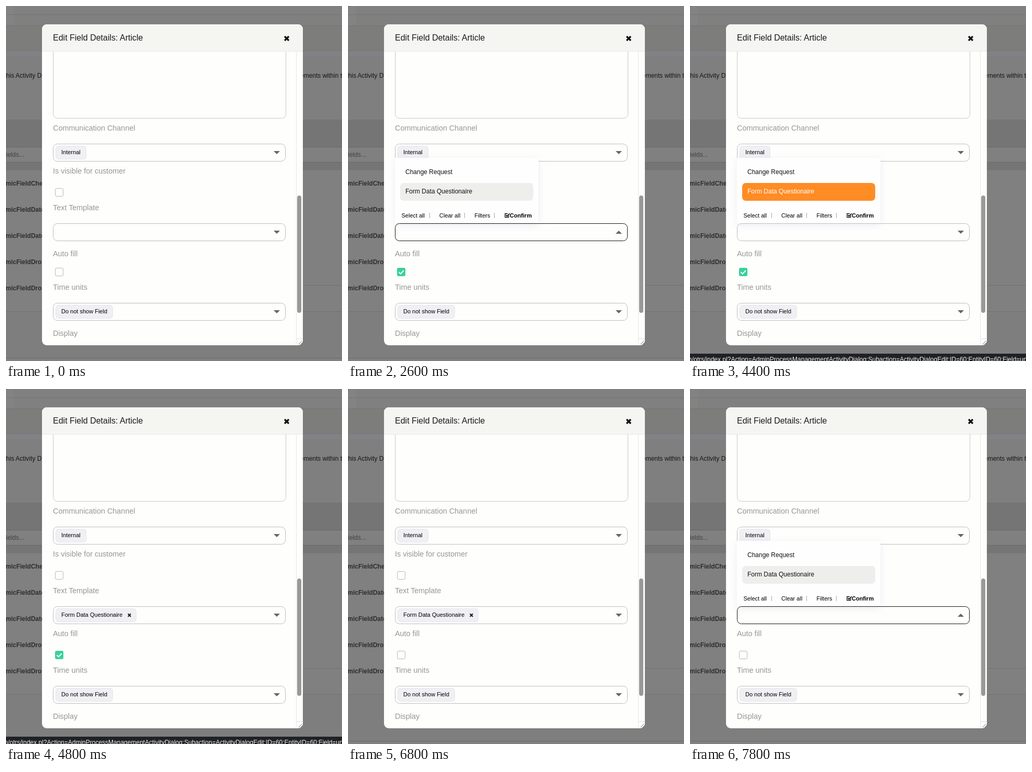
An HTML page that plays this animation: 644x678 px, repeating every 8 s.

```html
<!DOCTYPE html>
<html lang="en">
<head>
<meta charset="utf-8">
<title>Edit field details</title>
<style>
  html, body { margin: 0; width: 100%; height: 100%; overflow: hidden; background: #808080; }
  svg { display: block; font-family: "Liberation Sans", Arial, sans-serif; white-space: pre; }
  .popup { filter: drop-shadow(0 3px 7px rgba(70, 70, 150, .09)); }
</style>
</head>
<body>
<svg id="stage" width="644" height="678" viewBox="0 0 644 678"></svg>
<script>
const LOOP = 8000, TICK = 200;
const stage = document.getElementById('stage');

const rect = (x, y, w, h, fill, r = 0, more = '') =>
  `<rect x="${x}" y="${y}" width="${w}" height="${h}" rx="${r}" fill="${fill}" ${more}/>`;
// Crisp one-pixel outline, given by its outer edges
const box = (x, y, w, h, fill, line, r = 0) =>
  rect(x + .5, y + .5, w - 1, h - 1, fill, r, `stroke="${line}"`);
const text = (x, y, size, fill, s, more = '') =>
  `<text x="${x}" y="${y}" font-size="${size}" fill="${fill}" ${more}>${s}</text>`;
const path = (d, line, width, more = '') =>
  `<path d="${d}" fill="none" stroke="${line}" stroke-width="${width}" ${more}/>`;
const bold = 'font-weight="700"';

const label = (y, s) => text(90, y, 14.4, '#969696', s);

const cross = (x, y, r, width) =>
  path(`M${x - r} ${y - r}l${2 * r} ${2 * r}m0 ${-2 * r}l${-2 * r} ${2 * r}`, '#111', width);

const chip = (y, w, s) =>
  box(95, y + 4, w, 26, '#f0f0f4', '#e6e6ea', 5) + text(106, y + 20, 11, '#000', s);

const select = (y, inner = '', line = '#bdbdbd', up = false) =>
  box(90, y, 446, 34, 'none', line, 8) + inner +
  `<path d="${up ? `M513 ${y + 20}h12l-6-6z` : `M513 ${y + 14}h12l-6 6z`}" fill="#666"/>`;

function checkbox(y, state = 'off') {
  if (state === 'off') return box(94, y, 16, 16, '#fefefe', '#b9b9b9', 2.5);
  if (state === 'focus') return box(94, y, 16, 16, '#fefefe', '#8b8b8b', 2.5);
  const tick = path(`M97.5 ${y + 8.3}l3.2 3.2 6-6.3`, '#fff', 2,
    `opacity="${state === 'on' ? 1 : .5}"`);
  return rect(94, y, 16, 16, state === 'on' ? '#3bd19b' : '#62d9ae', 3) + tick;
}

function backdrop() {
  const fields = ['Che', 'Date', 'Date', 'Drop', 'Drop'];
  return rect(0, 0, 644, 678, '#808080') +
    rect(0, 0, 15, 37, '#838384') +
    rect(0, 16, 644, 1, '#757575') +
    rect(0, 37, 644, 1, '#757575') +
    rect(0, 38, 644, 48, '#7d7d7c') +
    rect(0, 85, 644, 1, '#777') +
    rect(0, 86, 644, 10, '#818285') +
    rect(0, 96, 640, 121, '#7f7f7f') +
    rect(0, 217, 644, 96, '#757575') +
    box(-9, 269, 662, 30, '#808080', '#696969') +
    rect(0, 313, 644, 1, '#7b7b7b') +
    rect(569, 533, 75, 1, '#717171') +
    rect(0, 583, 644, 1, '#717171') +
    rect(0, 584, 644, 88, '#7e7e7e') +
    rect(0, 672, 644, 1, '#6c6c6c') +
    text(-3, 137, 12, '#161616', 'this Activity Dialog') +
    text(564, 137, 12, '#161616', 'ements within the') +
    text(0, 288, 12, '#424242', 'ields...') +
    fields.map((s, i) => text(-1, 343 + 50 * i, 12, '#2d2d2d', 'micField' + s, bold)).join('') +
    rect(0, 543, 69, 5, '#808080');
}

function popup(row, ink) {
  const item = (x, s, more) => text(x, 404, 11, '#000', s, more);
  const bar = x => rect(x, 395, 1, 10, '#a5a5a5');
  return rect(90, 290, 275, 126, '#fefefe', 2, 'class="popup"') +
    text(110, 321, 12, '#111', 'Change Request') +
    rect(100, 338, 255, 34, row, 7) +
    text(110, 358, 12, ink, 'Form Data Questionaire') +
    item(102.5, 'Select all') + bar(156) +
    item(175, 'Clear all') + bar(223) +
    item(242.5, 'Filters') + bar(280) +
    path('M308 400v3.5h-7v-7h5', '#111', 1.3) +
    path('M302.5 399l2.3 2.4 5-5', '#111', 1.8) +
    item(310, 'Confirm', bold);
}

function status(wide, opacity) {
  const url = 'n/otrs/index.pl?Action=' + (wide
    ? 'AdminProcessManagementActivityDialog;Subaction=ActivityDialogEdit;ID=60;EntityID=60;Field=undefined'
    : '…');
  return `<g opacity="${opacity}">` + rect(-9, 664, wide ? 670 : 151, 24, '#202124', 4) +
    text(-3, 679, 12, '#f1f1f1', url) + '</g>';
}

function scene(t) {
  const within = (a, b) => t >= a && t < b;
  const open = within(2200, 4800) || t >= 7400;
  const focused = within(2200, 3000) || t >= 7400;
  const fading = within(2200, 2400) || within(7400, 7600);
  const filled = within(4800, 7400);
  const [row, ink] = within(3400, 4800) ? ['#ff8c25', '#fff']
    : within(3200, 3400) ? ['#f8b77e', '#6b5a4c'] : ['#eeeeed', '#111'];
  const auto = within(1000, 1400) || within(6600, 6800) ? 'focus'
    : within(1400, 1600) ? 'half'
    : within(1600, 6600) ? 'on' : 'off';
  const line = fading ? '#6b6b6b' : focused ? '#161616' : '#bdbdbd';

  return backdrop() +
    (t >= 400 ? rect(0, 0, 1, 1, '#000') : '') +
    // Dialog frame and header
    rect(69, 35, 500, 613, '#fefefd', 9) +
    '<path d="M69 86V44a9 9 0 0 1 9-9h482a9 9 0 0 1 9 9v42z" fill="#f5f5f2"/>' +
    rect(69, 86, 500, 1, '#e9e9e7') +
    text(90, 66, 16, '#1b1b1b', 'Edit Field Details: Article') +
    cross(538, 62, 4, 3.2) +
    // Scrollbar and resize corner
    rect(556, 87, 1, 560, '#e6e6e6') +
    rect(558, 362, 8, 224, '#999', 4) +
    rect(557, 635, 11, 1, '#dedede') +
    path('M561 646l6-6m-2 6l2-2', '#777', 1) +
    // Form
    path('M90.5 87V206.5a8 8 0 0 0 8 8H528.5a8 8 0 0 0 8-8V87', '#c9c9c9', 1) +
    label(238, 'Communication Channel') +
    select(263, chip(263, 59, 'Internal')) +
    label(320, 'Is visible for customer') +
    checkbox(348) +
    label(390, 'Text Template') +
    (open ? popup(row, ink) : '') +
    select(415, filled ? chip(415, 155, 'Form Data Questionaire') + cross(236.5, 432, 2.7, 2) : '',
      line, focused) +
    label(t < 4800 ? 478 : 472, 'Auto fill') +
    checkbox(500, auto) +
    label(542, 'Time units') +
    select(567, chip(567, 110, 'Do not show Field')) +
    label(630, 'Display') +
    (within(3000, 5400) ? status(t >= 4400, t < 3200 || t >= 5200 ? .6 : 1) : '');
}

let shown = -1;
function frame(now) {
  const tick = Math.floor(now % LOOP / TICK);
  if (tick !== shown) stage.innerHTML = scene((shown = tick) * TICK);
  requestAnimationFrame(frame);
}
frame(0);
</script>
</body>
</html>
```
